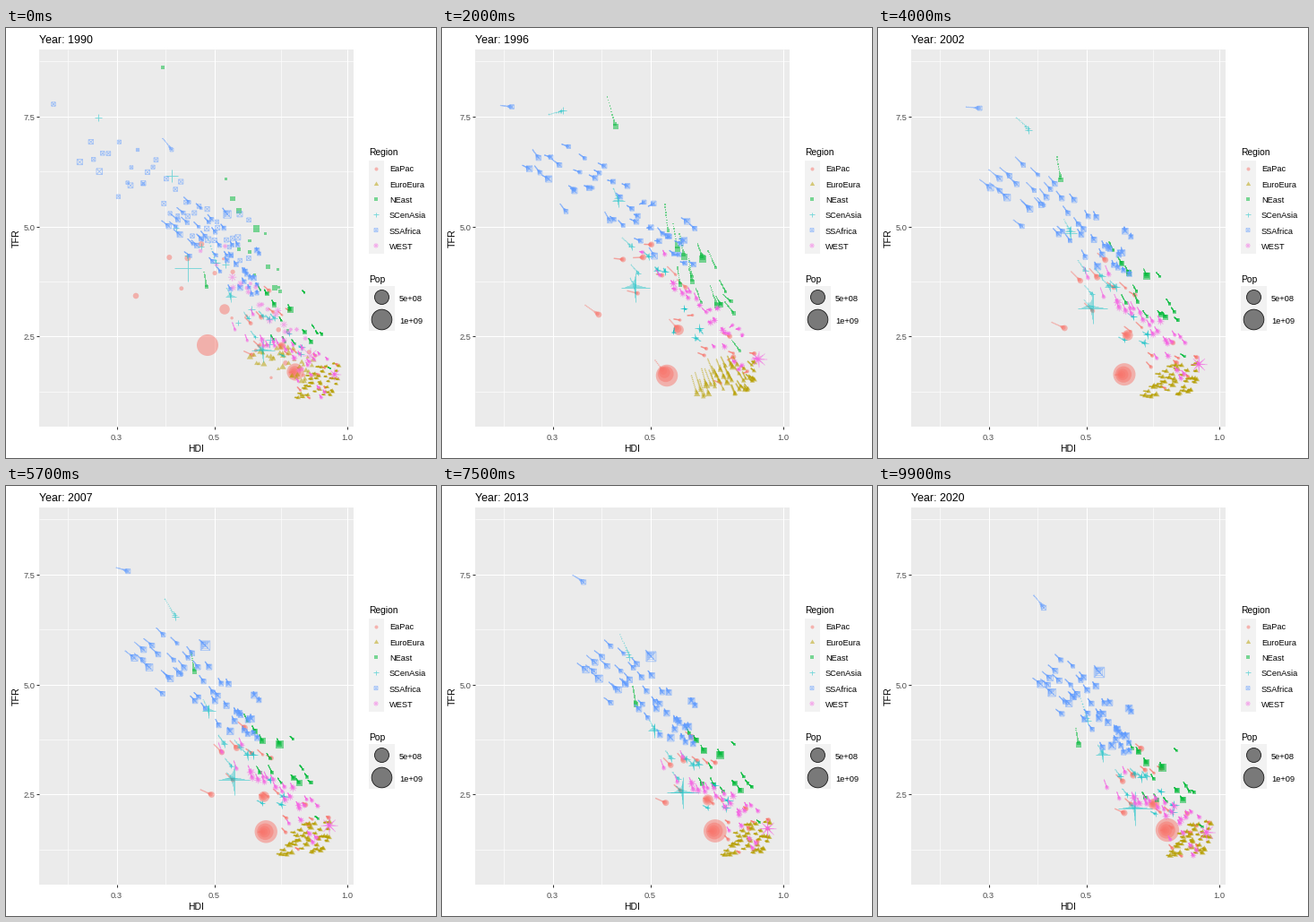
Animation, 480 px wide and 480 px high, one loop 10000 ms. Source, as a matplotlib script:

```python
import numpy as np
import matplotlib.pyplot as plt
from matplotlib.animation import FuncAnimation
from matplotlib.patches import Circle, Rectangle
from matplotlib.path import Path

SIZE, DPI, FRAMES, WAKE = 480, 72, 100, 10
TURN = 20  # the early, steeper phase ends here
plt.rcParams["font.family"] = "Liberation Sans"
rng = np.random.default_rng(12)
steps = np.arange(FRAMES)


def strokes(*segs):
    verts = [p for a, b in segs for p in (a, b)]
    return Path(verts, [Path.MOVETO, Path.LINETO] * len(segs))


R2 = 2 ** 0.5
CROSS = [((-R2, 0), (R2, 0)), ((0, -R2), (0, R2))]
DIAG = [((-1, -1), (1, 1)), ((-1, 1), (1, -1))]
BOX = [((-1, -1), (1, -1)), ((1, -1), (1, 1)), ((1, 1), (-1, 1)), ((-1, 1), (-1, -1))]
TRIANGLE = Path([(0, 1.555), (1.347, -0.777), (-1.347, -0.777), (0, 1.555)], closed=True)


class Region:
    """Countries of one colour and marker; positions are in pixels."""

    def __init__(self, name, color, marker, reach, filled, growth):
        self.name, self.color, self.marker = name, color, marker
        self.reach, self.filled, self.growth = reach, filled, growth
        self.xs, self.ys, self.rs = [], [], []

    def country(self, pop, start, turn, end, bend=0.8, born=0):
        early = np.clip(steps / TURN, 0, 1)
        late = np.clip((steps - TURN) / (FRAMES - 1 - TURN), 0, 1)
        for out, a, b, c, power in zip((self.xs, self.ys), start, turn, end, (0.8, bend)):
            out.append(a + (b - a) * early + (c - b) * late ** power)
        self.xs[-1][:born] = -50
        people = pop * (1 + self.growth * (2 * steps / (FRAMES - 1) - 1))
        self.rs.append(1.2 + 0.32 * np.sqrt(people))

    def crowd(self, n, skew, spread, pop, *lines):
        """Scatter n countries about a line that moves through three places."""
        for i in range(n):
            u = ((i + rng.random()) / n) ** skew
            own = np.clip(rng.normal(0, spread), -1.7 * spread, 1.7 * spread)
            spots = []
            for x0, y0, x1, y1 in lines:
                dx, dy = rng.normal(0, 0.2 * spread, 2)
                spots.append((x0 + (x1 - x0) * u + 0.4 * dx, y0 + (y1 - y0) * u + own + dy))
            self.country(1 + rng.exponential(pop), *spots)

    def marks(self, x, y, r):
        look = (dict(facecolors=self.color, linewidths=0) if self.filled else
                dict(facecolors="none", edgecolors=self.color, linewidths=0.9))
        return ax.scatter(x, y, s=self.area(np.asarray(r)), marker=self.marker,
                          alpha=0.5, zorder=3, **look)

    def area(self, r):
        return (2 * self.reach * r) ** 2


eap = Region("EaPac", "#F8766D", "o", 1, True, 0.1)
eur = Region("EuroEura", "#B79F00", TRIANGLE, 1.555, True, 0.03)
nea = Region("NEast", "#00BA38", "s", 1, True, 0.25)
sca = Region("SCenAsia", "#00BFC4", strokes(*CROSS), R2, False, 0.2)
ssa = Region("SSAfrica", "#619CFF", strokes(*BOX, *DIAG), 1, False, 0.35)
west = Region("WEST", "#F564E3", strokes(*CROSS, *DIAG), R2, False, 0.13)
regions = [eap, eur, nea, sca, ssa, west]

ssa.crowd(43, 0.8, 19, 15, (78, 125, 275, 245), (92, 140, 285, 250), (181, 205, 285, 285))
sca.crowd(9, 1, 18, 25, (185, 225, 310, 360), (205, 245, 296, 345), (268, 335, 338, 350))
nea.crowd(15, 1, 24, 18, (245, 195, 318, 310), (250, 250, 338, 325), (283, 310, 362, 350))
eap.crowd(17, 0.8, 22, 18, (170, 220, 340, 400), (190, 230, 350, 400), (265, 300, 366, 412))
west.crowd(27, 0.6, 14, 10, (215, 230, 335, 370), (220, 240, 340, 370), (252, 325, 360, 390))
eur.crowd(42, 0.8, 9, 10, (272, 355, 345, 385), (285, 396, 352, 388), (327, 398, 372, 390))

# the largest and the outermost countries
eap.country(1270, (225, 354), (251, 388), (323, 384))
eap.country(225, (244, 314), (264, 337), (308, 355))
eap.country(47, (145, 299), (175, 320), (275, 365))
sca.country(1150, (203, 268), (216, 290), (287, 360))
sca.country(160, (185, 165), (197, 193), (251, 300))
sca.country(25, (103, 100), (135, 92), (234, 262), bend=1.5)
nea.country(20, (175, 44), (194, 110), (224, 289))
ssa.country(15, (53, 85), (78, 88), (185, 136), bend=2.5)
ssa.country(150, (170, 150), (193, 158), (247, 208), bend=1.2, born=44)
west.country(290, (340, 366), (354, 370), (367, 387))

fig = plt.figure(figsize=(SIZE / DPI, SIZE / DPI), dpi=DPI, facecolor="white")
ax = fig.add_axes([0, 0, 1, 1])
ax.set(xlim=(0, SIZE), ylim=(SIZE, 0))
ax.axis("off")


def box(x, y, w, h, color):
    ax.add_patch(Rectangle((x, y), w, h, fc=color, lw=0, zorder=0))


def line(xs, ys, color="white", lw=1.07):
    ax.plot(xs, ys, color=color, lw=lw, zorder=1, solid_capstyle="butt")


def label(x, y, s, size=9.2, color="black", ha="left", **kw):
    return ax.text(x, y, s, size=size, color=color, ha=ha,
                   va=kw.pop("va", "center_baseline"), **kw)


def hdi_x(v):
    return 380.5 + 213.4 * np.log(v)


def tfr_y(v):
    return 467 - 49.1 * v


L, T, R, B = 37, 24, 388, 445
GREY = "#4D4D4D"
box(L, T, R - L, B - T, "#EBEBEB")
ticks = [hdi_x(v) for v in (0.3, 0.5, 1)]
for gx in (2 * ticks[0] - np.mean(ticks[:2]), np.mean(ticks[:2]), np.mean(ticks[1:])):
    line([gx, gx], [T, B], lw=0.6)
for v in (1.25, 3.75, 6.25, 8.75):
    line([L, R], [tfr_y(v)] * 2, lw=0.6)
for gx, s in zip(ticks, ("0.3", "0.5", "1.0")):
    line([gx, gx], [T, B])
    line([gx, gx], [B, B + 3], "#333333")
    label(gx, 456, s, color=GREY, ha="center")
for v in (2.5, 5.0, 7.5):
    gy = tfr_y(v)
    line([L, R], [gy, gy])
    line([L - 3, L], [gy, gy], "#333333")
    label(32.5, gy + 0.5, f"{v}", color=GREY, ha="right")
label(212.5, 469, "HDI", 10.4, ha="center")
label(11.5, 235, "TFR", 10.8, ha="center", va="center", rotation=90)
title = label(37, 17, "", 12.4, va="baseline")

label(405, 137.5, "Region", 10.3)
box(405, 148, 17, 104, "#F2F2F2")
for i, region in enumerate(regions):
    ky = 157 + 17.28 * i
    region.marks([413], [ky - 0.5], [2])
    label(428, ky, region.name)
label(405, 279.5, "Pop", 10.3)
box(405, 288, 29, 50, "#F2F2F2")
for ky, r, s in ((300.5, 8, "5e+08"), (325.5, 11.3, "1e+09")):
    ax.add_patch(Circle((419.5, ky), r, fc="#797979", ec="#222222", lw=0.9, zorder=3))
    label(439, ky + 1, s)

layers = [region.marks([], [], []) for region in regions]
paths = [tuple(np.array(a).T for a in (g.xs, g.ys, g.rs)) for g in regions]
ages = np.arange(WAKE, -1, -1)
fade = (1 - ages / WAKE) ** 3


def draw(k):
    title.set_text(f"Year: {round(1990 + 30 * k / (FRAMES - 1))}")
    at = (k - ages) % FRAMES
    for region, layer, (x, y, r) in zip(regions, layers, paths):
        layer.set_offsets(np.column_stack([x[at].ravel(), y[at].ravel()]))
        r = np.maximum(r[at] * fade[:, None], 0.8 if region.filled else 0.4)
        layer.set_sizes(region.area(r.ravel()))
        if not region.filled:
            layer.set_linewidths(np.repeat(0.5 + 0.4 * fade, x.shape[1]))
    return [title, *layers]


anim = FuncAnimation(fig, draw, frames=FRAMES, interval=100, repeat=True, repeat_delay=0)
plt.show()
```
